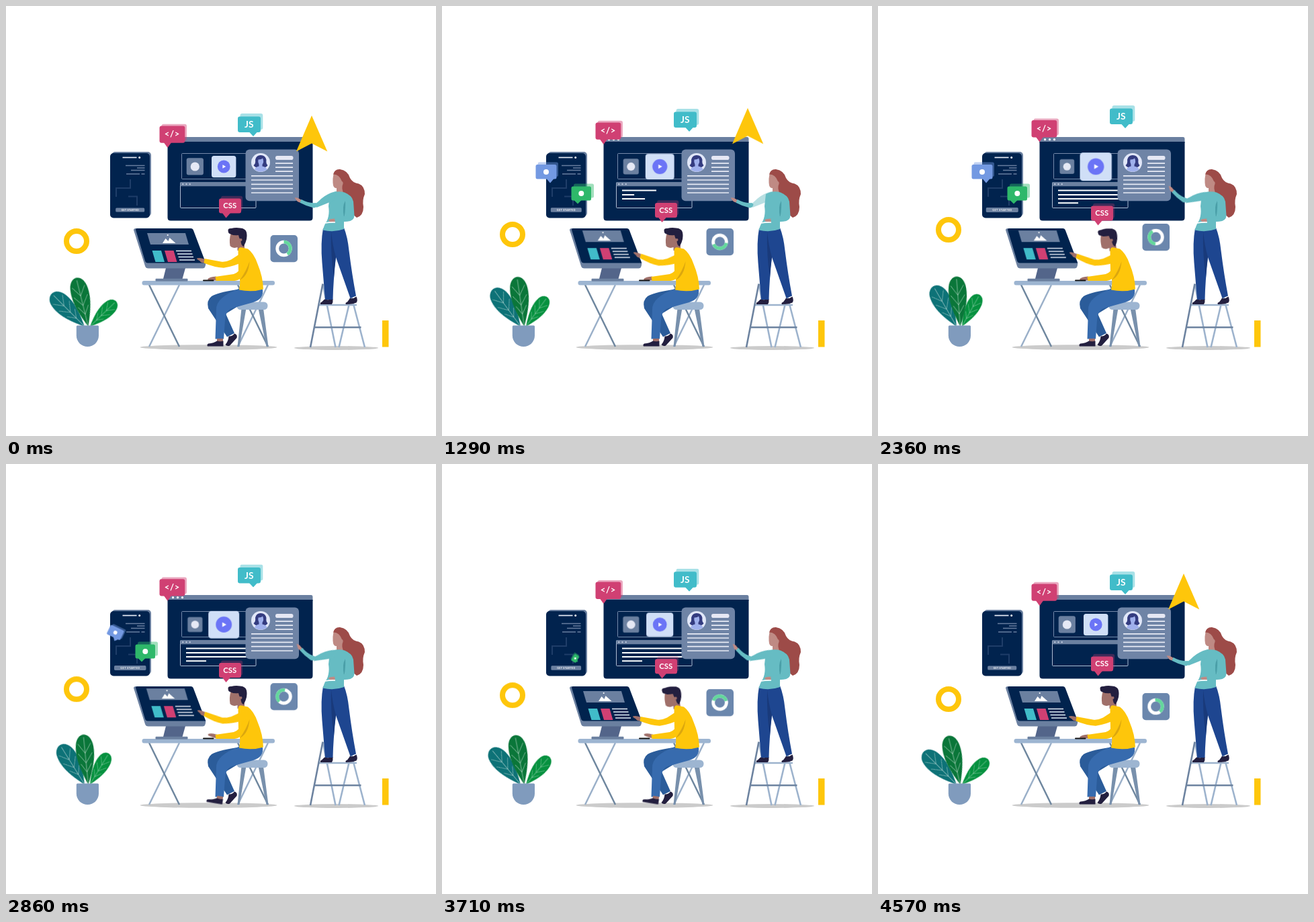
Recreate the animation shown at these times as an HTML page. Size 640 px wide and 640 px high, loop 4.64 s.

```html
<!DOCTYPE html>
<html lang="en">
<head>
<meta charset="utf-8">
<title>Web development team</title>
<style>
  html, body { margin: 0; width: 100%; height: 100%; overflow: hidden; background: #fff; }
  svg { display: block; width: 100vw; height: 100vh; }
  text { font-family: Lato, "Open Sans", sans-serif; font-weight: 700; fill: #fff; text-anchor: middle; }
  .navy { fill: #01234e; }
  .slate { fill: #6b80a0; }
  .pink { fill: #d04073; }
  .teal { fill: #41bcc9; }
  .blue { fill: #7399e2; }
  .green { fill: #2eb86a; }
  .yellow { fill: #fec60b; }
  .dark { fill: #231f3f; }
  .steel { fill: #9db5d1; }
  .back { opacity: .45; }
  .line { fill: none; stroke: #e8ebf5; stroke-width: 1.7; }

  /* sine swing between the two ends of the loop */
  .sway { animation: sway 2.32s cubic-bezier(.37,0,.63,1) infinite alternate; }
  @keyframes sway { from { transform: var(--from, none); } to { transform: var(--to); } }

  .loop { animation: 4.64s linear infinite; }
  .spin { transform-origin: 413.5px 361px; animation-name: spin; }
  @keyframes spin { to { transform: rotate(360deg); } }

  .pointer { transform-origin: 455px 190px; animation-name: pointer; animation-timing-function: ease-in-out; }
  @keyframes pointer {
    0%, 1% { transform: none; opacity: 1; }
    11.5%, 13.5% { transform: rotate(-90deg); }
    24% { transform: none; animation-timing-function: cubic-bezier(.45,.1,.5,1); }
    34% { opacity: 1; }
    40% { transform: translateY(-73px); opacity: .4; }
    44% { transform: translateY(-73px); opacity: 0; }
    44.1%, 87% { transform: scale(.2); opacity: 0; }
    89% { opacity: 1; }
    97%, 100% { transform: none; opacity: 1; }
  }

  .tag1 { transform-origin: 162px 264px; animation-name: tag1; }
  @keyframes tag1 {
    0%, 3% { transform: rotate(90deg) scale(0); }
    12.3% { transform: rotate(9deg) scale(.91); }
    14%, 58.5% { transform: none; }
    61.6% { transform: rotate(25deg) scale(.72); }
    67%, 100% { transform: rotate(90deg) scale(0); }
  }
  .tag2 { transform-origin: 202px 294px; animation-name: tag2; }
  @keyframes tag2 {
    0%, 18% { transform: rotate(-90deg) scale(0); }
    27.8%, 74% { transform: none; }
    80% { transform: rotate(-58deg) scale(.38); }
    84%, 100% { transform: rotate(-90deg) scale(0); }
  }

  .type { transform-origin: 268px 0; }
  .t1 { animation-name: t1; } .t2 { animation-name: t2; }
  .t3 { animation-name: t3; } .t4 { animation-name: t4; }
  @keyframes t1 { 0%, 12% { transform: scaleX(0); } 27.8% { transform: scaleX(.51); } 43%, 83% { transform: none; } 95%, 100% { transform: scaleX(0); } }
  @keyframes t2 { 0%, 22% { transform: scaleX(0); } 27.8% { transform: scaleX(.18); } 47%, 83% { transform: none; } 95%, 100% { transform: scaleX(0); } }
  @keyframes t3 { 0%, 17% { transform: scaleX(0); } 27.8% { transform: scaleX(.34); } 47%, 83% { transform: none; } 95%, 100% { transform: scaleX(0); } }
  @keyframes t4 { 0%, 32% { transform: scaleX(0); } 48%, 83% { transform: none; } 95%, 100% { transform: scaleX(0); } }

  .scroll { animation-name: scroll; }
  @keyframes scroll { 0%, 2%, 78%, 100% { transform: none; } 11%, 63% { transform: translate(-1.2px, -3.8px); } }
  .swipe { transform-origin: 345px 378px; animation-name: swipe; }
  @keyframes swipe { 0%, 2%, 78%, 100% { transform: none; } 11%, 63% { transform: rotate(8.5deg); } }

  .nod { transform-origin: 353px 362px; animation: nod 1.54667s ease-in-out infinite; }
  @keyframes nod { 0%, 82%, 100% { transform: none; } 36%, 56% { transform: rotate(-7deg); } }
  .tap { animation: tap 1.16s ease-in-out infinite; }
  @keyframes tap { 0%, 11%, 95%, 100% { transform: none; } 20%, 52% { transform: rotate(var(--lift)); } }

  .head { transform-origin: 495px 275px; animation-name: head; animation-timing-function: ease-in-out; }
  @keyframes head { 0%, 28%, 100% { transform: none; } 11%, 16% { transform: translate(-3px, 3px) rotate(-9deg); } }
  .bent { transform-origin: 507px 283px; animation-name: bent; animation-timing-function: ease-in-out; }
  @keyframes bent { 0%, 28%, 100% { transform: none; } 11%, 16% { transform: rotate(17deg); } }
  .upper { animation-name: upper; }
  @keyframes upper { 0%, 3%, 31%, 100% { opacity: 1; } 6%, 25% { opacity: 0; } }
  .arm { transform-origin: 488px 281px; animation-name: arm; animation-timing-function: ease-in-out; }
  @keyframes arm { 0%, 37%, 97%, 100% { transform: none; } 48%, 82% { transform: rotate(14deg); } }
  .fore { transform-origin: 462px 296px; animation-name: fore; animation-timing-function: ease-in-out; }
  @keyframes fore { 0%, 37%, 97%, 100% { transform: none; } 48%, 82% { transform: rotate(7deg); } }
</style>
</head>
<body>
<svg viewBox="0 0 640 640">
  <defs>
    <g id="leaf">
      <path d="M0 0C-7 -14 -19 -38 -14.500 -58C-11 -76 10 -77 14.500 -58C19 -38 7 -14 0 0Z"/>
      <path d="M0 0V-68M0 -18L-9 -30M0 -31L-12 -45M0 -45L-11 -59M0 -18L9 -30M0 -31L12 -45M0 -45L11 -59"
            fill="none" stroke="#dff0e8" stroke-width=".75" opacity=".75"/>
    </g>
    <clipPath id="screen"><path d="M194 332H277L296 382H208Z"/></clipPath>
  </defs>

  <!-- floor shadows, bar, ring -->
  <ellipse cx="301.5" cy="508" rx="102" ry="3.8" fill="#cbcbcb"/>
  <ellipse cx="491.5" cy="509" rx="62.5" ry="3" fill="#cbcbcb"/>
  <rect class="yellow" x="560" y="468" width="9.500" height="39.500"/>
  <circle class="sway" style="--to:translateY(-17px)" cx="105" cy="350" r="15" fill="none" stroke="#fec60b" stroke-width="8"/>

  <!-- plant -->
  <g transform="translate(117 477)"><g class="sway" style="--from:rotate(-45deg);--to:rotate(-30deg)"><use href="#leaf" fill="#0d7277" transform="scale(.9 .96)"/></g></g>
  <g transform="translate(125 477)"><g class="sway" style="--from:rotate(46deg);--to:rotate(29deg)"><use href="#leaf" fill="#06913f" transform="scale(.68 .75)"/></g></g>
  <g transform="translate(122.500 477)"><g class="sway" style="--from:rotate(-14deg);--to:rotate(-4.500deg)"><use href="#leaf" fill="#0a7639" transform="scale(.87 1.04)"/></g></g>
  <path d="M106.500 475.500H136.500Q138 475.500 138 477V490.500A16.600 16.600 0 0 1 104.800 490.500V477Q104.800 475.500 106.500 475.500Z" fill="#809bbd"/>

  <!-- wall display -->
  <path class="slate" d="M243 195H454Q456.500 195 456.500 198V204H240.500V198Q240.500 195 243 195Z"/>
  <path class="navy" d="M240.500 202H456.500V315Q456.500 319.500 452 319.500H245Q240.500 319.500 240.500 315Z"/>
  <g fill="#fff"><circle cx="248.500" cy="198.700" r="1.600"/><circle cx="255.500" cy="198.700" r="1.600"/><circle cx="262.500" cy="198.700" r="1.600"/></g>
  <rect x="261.500" y="219.500" width="112" height="38" rx="1" fill="none" stroke="#8496b5" stroke-width=".9"/>
  <rect x="259.500" y="262.500" width="112.500" height="38" rx="1" fill="none" stroke="#c3cce0" stroke-width=".9"/>
  <rect class="slate" x="259.500" y="262" width="112.500" height="6.300" rx="1"/>
  <g fill="#c9d2e4"><circle cx="263.300" cy="265.200" r="1.100"/><circle cx="268.500" cy="265.200" r="1.100"/><circle cx="273.700" cy="265.200" r="1.100"/></g>
  <g fill="#fff">
    <rect class="type loop t1" x="268" y="273.500" width="100" height="2"/>
    <rect class="type loop t2" x="268" y="280" width="100" height="2"/>
    <rect class="type loop t3" x="268" y="286" width="100" height="2"/>
    <rect class="type loop t4" x="268" y="292.200" width="30" height="2"/>
  </g>
  <g class="sway" style="--to:scale(.86);transform-origin:281.300px 239px">
    <rect class="slate" x="268.700" y="226.300" width="25.200" height="25.200" rx="3"/>
    <circle cx="281.300" cy="239" r="6.600" fill="#e6e9f5"/>
  </g>
  <g class="sway" style="--to:scale(1.3);transform-origin:324.200px 239px">
    <rect x="306" y="223" width="36.400" height="32.300" rx="3.500" fill="#d0dff7"/>
    <circle cx="324.200" cy="239" r="9.400" fill="#6b74f6"/>
    <path d="M322.400 236.300L327.200 239L322.400 241.800Z" fill="#fff"/>
  </g>

  <!-- profile card -->
  <rect x="356.500" y="213.500" width="79.500" height="76.800" rx="6" fill="#6f84a6"/>
  <circle cx="379" cy="233" r="14" fill="#e1e7f8"/>
  <path d="M368.500 237Q372 234 371 229Q372.500 222 379 222Q386 222 387.500 229Q386.500 234 389.500 237Q387 241 382 240H376Q371 241 368.500 237Z" fill="#343c80"/>
  <path d="M370 243.500Q371 239.500 376.500 238.500V236Q374.500 232 375.500 228.500Q380 229 382 226.500Q384.500 232 381.500 236V238.500Q387.500 239.500 388.500 243.500Q379 250 370 243.500Z" fill="#9fb0ec"/>
  <rect x="401" y="223" width="26.500" height="6" rx="2.800" fill="#e6e8f4"/>
  <path class="line" d="M401 234.200H427M401 240.200H427M401 246.200H427M365 252.800H427M365 259H427M365 265.300H427M365 271.600H427M365 278H427"/>

  <!-- floating labels -->
  <g class="sway" style="--to:translateY(-12px)">
    <rect class="teal back" x="348.500" y="160" width="33.800" height="24" rx="3"/>
    <path class="teal" d="M361.500 187H374.500L368 194Z"/>
    <rect class="teal" x="345" y="164.500" width="34" height="23.500" rx="3"/>
    <text x="361.800" y="181.300" font-size="13.800">JS</text>
  </g>
  <g class="sway" style="--to:translateY(-8.400px)">
    <rect class="pink back" x="231.500" y="175.800" width="37.500" height="25" rx="3"/>
    <path class="pink" d="M234 202H247L240.500 211Z"/>
    <rect class="pink" x="228.500" y="178.500" width="37.800" height="25.300" rx="3"/>
    <text x="247.300" y="195.200" font-size="13" letter-spacing=".7">&lt;/&gt;</text>
  </g>
  <g class="sway" style="--to:translateY(11px)">
    <rect class="pink" opacity=".3" x="320" y="282.800" width="32.200" height="22" rx="3"/>
    <path class="pink" d="M321.500 307.500H334.500L327.500 315.500Z"/>
    <rect class="pink" x="317" y="286.500" width="33" height="22" rx="3"/>
    <text x="333.200" y="301.300" font-size="11.300">CSS</text>
  </g>

  <!-- phone -->
  <rect class="slate" x="157.500" y="217" width="58.500" height="96" rx="5"/>
  <rect class="navy" x="155" y="219" width="59" height="96.500" rx="5"/>
  <path class="line" d="M173.500 225.500H194.500"/>
  <circle cx="198.700" cy="225.500" r="1.500" fill="#fff"/>
  <path d="M178 237.500H206.500M195 241H206.500M186 244.500H206.500M179 250H199M201.500 250H206.500" fill="none" stroke="#687d9e" stroke-width="1.400"/>
  <path d="M164 284V271H185V258M182 283.500H195V297" fill="none" stroke="#1f3d68" stroke-width="2"/>
  <g class="sway" style="--to:scale(1.120);transform-origin:184.700px 303.500px">
    <rect class="slate" x="163.200" y="300.400" width="43" height="6.200" rx="1.500"/>
    <text x="184.900" y="304.800" font-size="3.500" letter-spacing=".35">GET STARTED</text>
  </g>
  <g class="loop tag1">
    <rect class="blue back" x="142.500" y="232.500" width="30.500" height="21.500" rx="2.500"/>
    <path class="blue" d="M155 256.500H167L161 263.500Z"/>
    <rect class="blue" x="139.500" y="236" width="31" height="21.500" rx="2.500"/>
    <circle cx="155" cy="247" r="4" fill="#fff"/>
  </g>
  <g class="loop tag2">
    <rect class="green back" x="196" y="264.500" width="30" height="21" rx="2.500"/>
    <path class="green" d="M196 288.500H208L202 294.500Z"/>
    <rect class="green" x="192.500" y="268.500" width="29.500" height="21" rx="2.500"/>
    <circle cx="207.300" cy="279" r="4" fill="#fff"/>
  </g>

  <!-- chart tile -->
  <g class="sway" style="--to:translateY(-17px)">
    <rect x="393.500" y="341" width="40.500" height="40.300" rx="5" fill="#6b87ad"/>
    <g class="loop spin" fill="none" stroke-width="4.800">
      <circle cx="413.500" cy="361" r="9.800" stroke="#fff"/>
      <circle cx="413.500" cy="361" r="9.800" stroke="#63d79c" pathLength="360" stroke-dasharray="148 212" transform="rotate(-90 413.500 361)"/>
    </g>
  </g>

  <!-- desk and chair -->
  <g fill="none" stroke-width="2.500">
    <path d="M258 415L213 507M390 415L345 507" stroke="#9bb0c9"/>
    <path d="M213 415L258 507M345 415L390 507" stroke="#6f879f"/>
  </g>
  <rect class="steel" x="202.500" y="409" width="197.500" height="6.500" rx="3"/>
  <path d="M350.500 450H357.500L347.500 507H344.500ZM375.500 450H383L390.500 507H387.500Z" fill="#7890ac"/>
  <rect class="steel" x="343.500" y="440.500" width="46" height="11.500" rx="5.500"/>

  <!-- computer -->
  <path d="M238 390H267L262.500 406H234Z" fill="#53658a"/>
  <rect class="slate" x="222.500" y="405.700" width="48" height="4" rx="1"/>
  <path class="slate" d="M190 333.500Q190 331 193 331H275L297.300 383Q297 390.500 293 390.500H212Q208 390.500 207 387Z"/>
  <path class="navy" d="M195 331H275Q278 331 279 334L297.300 382.500H211Q208 382.500 207 379.500L193 333Q193 331 195 331Z"/>
  <g clip-path="url(#screen)"><g class="loop scroll">
    <path class="slate" d="M210 338H267L272 355H215Z"/>
    <path d="M233 353L237.500 346L241.500 350L243.500 345L252.500 353Z" fill="#fff"/>
    <circle cx="240.700" cy="341" r="1.100" fill="#fff"/>
    <path class="teal" d="M217.500 364H231L236 381H222.500Z"/>
    <path class="pink" d="M236 364H249.500L254.500 381H241Z"/>
    <path class="line" d="M253 364.500H276M255 369H277.500M256.500 373.500H279M258 378H281"/>
  </g></g>

  <!-- seated man -->
  <path d="M352 421Q318 425 306 432Q298 438 301 450L329 492.500L340 487L327 458L350 444Z" fill="#2b5c9a"/>
  <path d="M346 421L382 422Q384 436 368 441Q350 446 336 450Q327 453 326 468L324 495.500H311.500L313 452Q312 434 346 421Z" fill="#376bae"/>
  <path class="dark" d="M331.500 491.500Q337 492 340 487.500Q345 489 343.500 494Q338 500 333 505.500Q329 507 326.500 504Q331 499 331.500 491.500Z"/>
  <g class="tap" style="--lift:9deg;transform-origin:322px 496px">
    <path d="M314 495H323V500H314Z" fill="#a0706a"/>
    <path class="dark" d="M314 498.500Q319 500 323.500 498.500V506.500H300Q298.500 504 301 502.500Q309 502 314 498.500Z"/>
  </g>
  <g class="nod">
    <path d="M334.500 339Q332 347 333.500 357Q337 361.500 344.500 359V364H355V348L349 338Z" fill="#a0706a"/>
    <path class="dark" d="M330.500 334Q330.500 330.500 335.500 331Q341.500 329.500 348.500 330.500Q356.500 331 358 337Q359.500 345 356.500 352L353.500 358Q349.500 356 349.500 349Q346.500 345 346 341Q337.500 342 332 338.500Q330.500 337 330.500 334Z"/>
    <circle cx="349.500" cy="348" r="2" fill="#a0706a"/>
  </g>
  <path class="yellow" d="M345.500 364Q346 358.500 351 359.500L360 361.500Q369 368 374.500 384Q382.500 403 383 421.500Q366 426.500 347 422.500Q350 408 346 396Z"/>
  <g class="tap" style="--lift:20deg;transform-origin:313px 406px">
    <path d="M300 406.500Q303 403 313 402.500V408.500H301.500Z" fill="#a0706a"/>
  </g>
  <path class="yellow" d="M354 382Q347 397 339 399L311.500 403L312.500 409H340Q352 408 362 390Z"/>
  <path d="M362.500 380Q358 394 348 408Q361 401 362.500 380Z" fill="#dba70f"/>
  <rect x="293" y="407.600" width="16.500" height="2" rx="1" fill="#141414"/>
  <g class="loop swipe">
    <path d="M284 375.500Q288 374 295.500 376.500L295 382.500Q290 382.500 288.500 379.500L284.500 377Z" fill="#a0706a"/>
    <path class="yellow" d="M357 362Q346 371 335 377.500Q327 381.500 320 380.500L295.500 376L294.500 382.500Q310 389 324 389.700Q340 387.500 357 379Z"/>
  </g>

  <!-- ladder -->
  <g fill="none" stroke-width="2.600" stroke="#9db3cd">
    <path d="M471.500 414L490.500 508M513.500 432L495.500 508M514 432L534 508M466 445H522"/>
    <path d="M471.500 413.500L453 508M459 478.200H528.500" stroke="#6d83a0"/>
  </g>

  <!-- standing woman -->
  <path class="dark" d="M474 436.500Q480 438 486.500 436Q487 441 485 444H468Q467 441.500 470 440.500ZM512 435Q517 436 521.500 432.500Q524 438 521.500 441.500Q516 444 506 444Q504 442 508 440.500Z"/>
  <path d="M472 331Q468 352 470.500 382L475 437H486.500Q487 410 491 374L512.500 435L521 431.500Q515 400 510.500 364Q508.500 344 503 330Z" fill="#1e4690"/>
  <path d="M484 336Q486 356 491 374Q489 386 488 404Q483 370 484 336Z" fill="#193a7b"/>
  <g class="loop head">
    <path d="M487.500 250Q486 257 486.500 263Q487 272 492 271V278H503V262L497 250Z" fill="#bf8a84"/>
    <path d="M487 250.500Q489 242.500 497 243Q509 245 512 256Q516 263.500 525 264.500Q534 268 534 280Q530 289 532 299Q532 312 522 315Q513.500 310 516 298Q517.500 289 508 285Q499 277 500.500 268Q503 262 500 261Q496 250 487 250.500Z" fill="#9d4b48"/>
  </g>
  <path d="M482 280Q492 274 504 277.500Q513 281 514.500 291Q505 303 503 320V332Q488 337.500 471.500 333.500Q474 325 477.500 320Q482 311 480 298Z" fill="#66bcc3"/>
  <path d="M505 290Q500 298 503 314L506 306Z" fill="#4a9fa8"/>
  <g class="loop bent">
    <path d="M479.500 318.500Q484 316 492 316.500V321.500H483Z" fill="#bf8a84"/>
    <path d="M503 278Q515 281 517 291L518.500 312Q518 320 508 320.700L490 322L489 316.500L504 313L505.500 294Z" fill="#66bcc3"/>
  </g>
  <path d="M475 323Q483 321.500 490 322" stroke="#fff" stroke-width="1.500" fill="none"/>
  <g class="loop arm">
    <path class="loop upper" d="M492 275.500Q478 279 469 287Q464 292 461 294L462 300Q475 295 489 289Z" fill="#66bcc3"/>
    <g class="loop fore">
      <path d="M429.500 285.500Q433 284 439.500 288.500L438 292.500Q433 291.500 432 288.500Z" fill="#bf8a84"/>
      <path d="M439.500 287.800Q450 294 461 293L463.500 295Q463 300 458 300.500Q447 298 437.500 292.800Z" fill="#66bcc3"/>
    </g>
  </g>

  <path class="yellow loop pointer" d="M455 163L478.300 216.500L455 204.500L432 216.500Z"/>
</svg>
</body>
</html>
```
